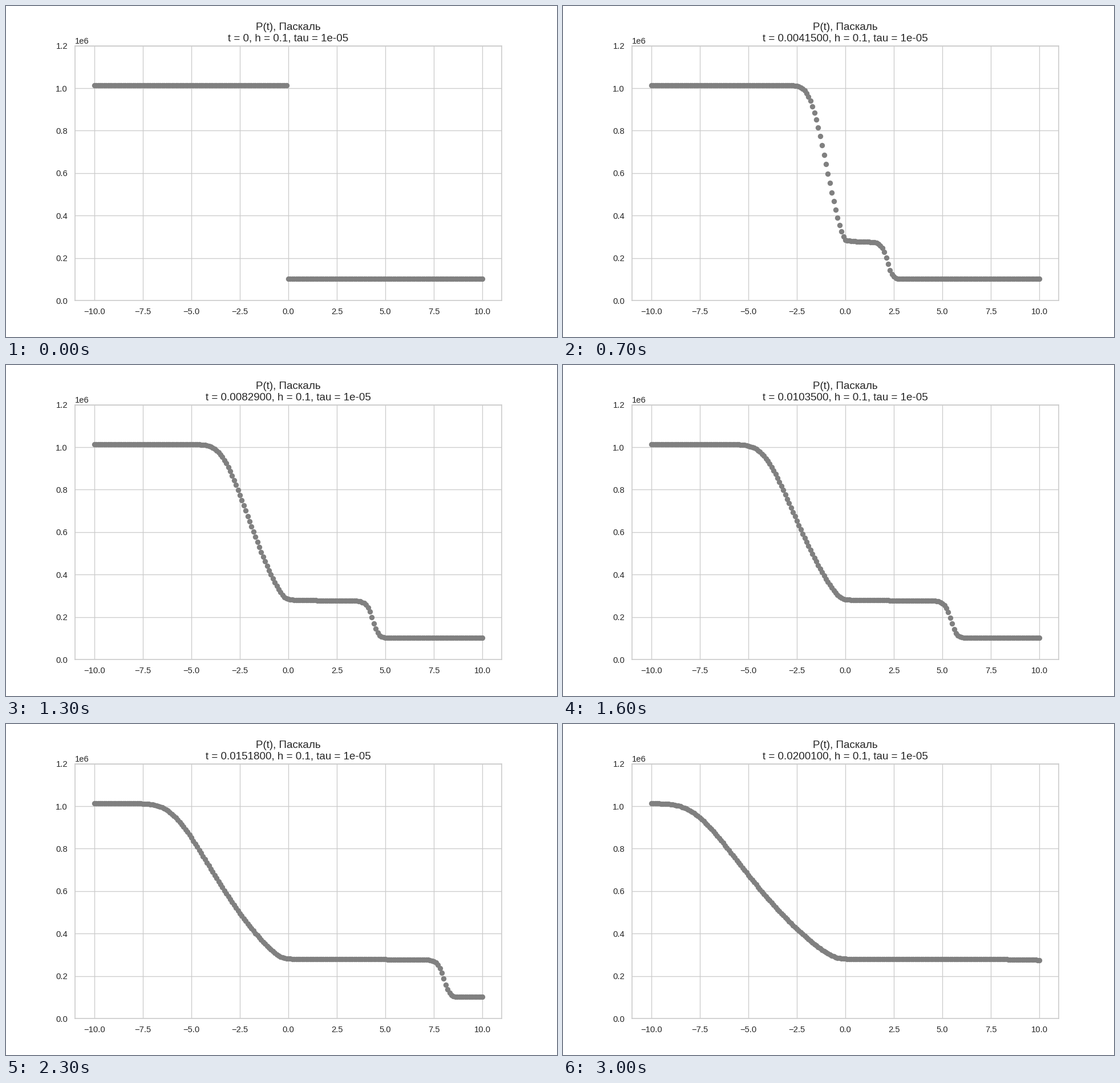
A matplotlib script for the animation above (3.1 s loop, 966x580 px).

```python
import numpy as np
import matplotlib.pyplot as plt
from matplotlib.animation import FuncAnimation

DPI = 96
SCALE = 96.6 / DPI  # point sizes are tuned for a 10 inch wide figure

# Shock tube: dense gas on the left, thin gas on the right, both at rest
GAMMA = 5 / 3
ATM = 101325
H, TAU = 0.1, 1e-5
CELLS = 201
FRAMES = 31
LAST_STEP = 2001

plt.rcParams.update({
    "font.family": "Liberation Sans",
    "text.color": "0.15",
    "axes.edgecolor": "0.8",
    "axes.linewidth": 1.25 * SCALE,
    "axes.axisbelow": True,
    "axes.titlesize": 14 * SCALE,
    "axes.titlepad": 6 * SCALE,
    "grid.color": "0.8",
    "grid.linewidth": SCALE,
})
for axis in ("xtick", "ytick"):
    plt.rcParams.update({
        f"{axis}.labelsize": 11 * SCALE,
        f"{axis}.color": "0.15",
        f"{axis}.major.size": 6 * SCALE,
        f"{axis}.major.pad": 3.5 * SCALE,
    })
plt.rcParams.update({"xtick.bottom": False, "ytick.left": False})


def initial_state():
    """Rows: density, momentum, internal energy per volume."""
    left = np.arange(CELLS) < CELLS // 2
    rho = np.where(left, 13.0, 1.3)
    p = np.where(left, 10.0 * ATM, ATM)
    return np.array([rho, np.zeros(CELLS), p / (GAMMA - 1)])


def advance(w):
    """One upwind step along the characteristics u + c, u, u - c."""
    rho, mom, energy = w[:, 1:-1]
    u = mom / rho
    c = np.sqrt(GAMMA * (GAMMA - 1) * energy / rho)

    def split(d):
        push = c * (d[1] - u * d[0])
        dp = (GAMMA - 1) * d[2]
        return np.array([dp + push, dp - c**2 * d[0], dp - push])

    diff = np.diff(w, axis=1)
    speed = np.array([u + c, u, u - c])
    flux = (np.maximum(speed, 0) * split(diff[:, :-1])
            + np.minimum(speed, 0) * split(diff[:, 1:]))

    dp = (flux[0] + flux[2]) / 2
    d_rho = (dp - flux[1]) / c**2
    d_mom = u * d_rho + (flux[0] - flux[2]) / (2 * c)
    change = np.array([d_rho, d_mom, dp / (GAMMA - 1)])

    new = w.copy()
    new[:, 1:-1] -= TAU / H * change
    new[:, 0], new[:, -1] = new[:, 1], new[:, -2]
    return new


def solve(steps):
    """Pressure profiles after each of the given step counts."""
    w, done, profiles = initial_state(), 0, []
    for step in steps:
        while done < step:
            w = advance(w)
            done += 1
        profiles.append((GAMMA - 1) * w[2])
    return profiles


steps = [0] + [int(round(s)) for s in np.linspace(1, LAST_STEP, FRAMES - 1)]
pressure = solve(steps)
x = np.linspace(-10, 10, CELLS)

fig, ax = plt.subplots(figsize=(966 / DPI, 580 / DPI), dpi=DPI)
fig.subplots_adjust(left=0.125, right=0.9, bottom=0.11, top=0.88)
dots, = ax.plot(x, pressure[0], "o", color="gray",
                markersize=6 * SCALE, markeredgewidth=SCALE)
ax.grid(True)
ax.set_xticks(np.arange(-10, 10.1, 2.5))
ax.set_yticks(np.arange(7) * 2e5)
ax.set_xlim(-11, 11)
ax.set_ylim(0, 1.2e6)


def draw(i):
    t = f"{steps[i] * TAU:.7f}" if i else "0"
    ax.set_title(f"P(t), Паскаль\nt = {t}, h = {H}, tau = {TAU}")
    dots.set_ydata(pressure[i])
    return dots, ax.title


anim = FuncAnimation(fig, draw, frames=FRAMES, interval=100,
                     init_func=lambda: draw(0), repeat=True, repeat_delay=0)
plt.show()
```
